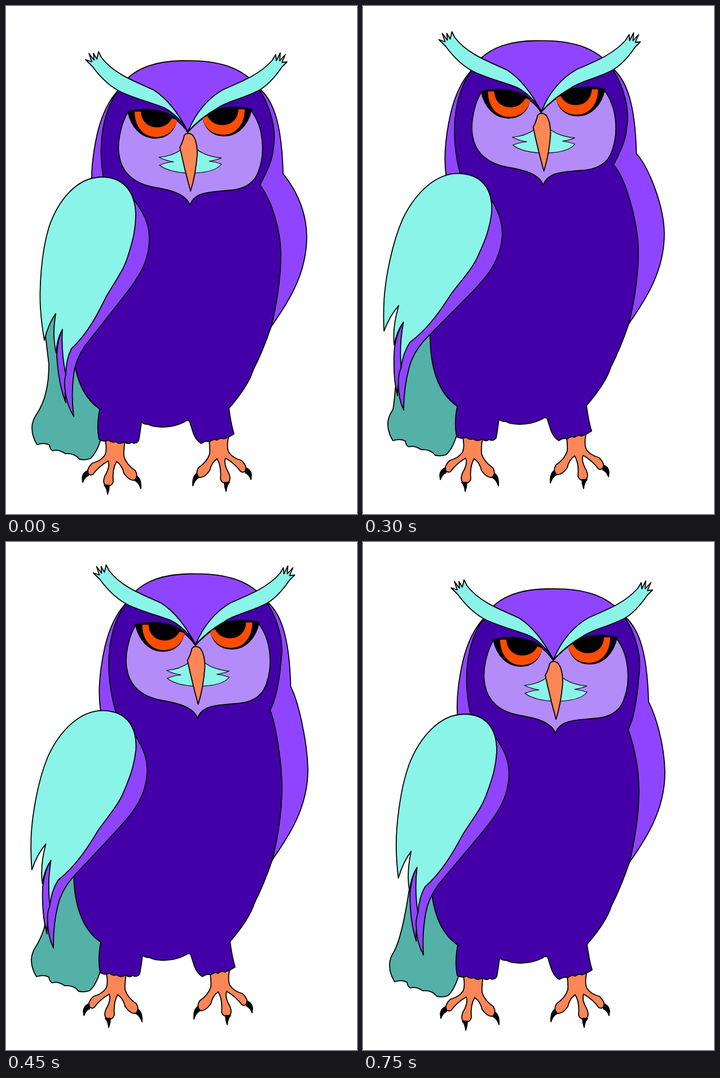
Animation, 622 px wide and 900 px high, one loop 900 ms. Source, as an HTML page:

```html
<!DOCTYPE html>
<html lang="en">
<head>
<meta charset="utf-8">
<title>Dancing owl</title>
<style>
  html, body { margin: 0; width: 100%; height: 100%; overflow: hidden; background: #fff; }
  svg { display: block; width: 622px; height: 900px; }
</style>
</head>
<body>
<svg id="stage" viewBox="0 0 622 900" stroke="#000" stroke-width="1.8" stroke-linejoin="round" stroke-linecap="round"></svg>
<script>
const AQUA = '#8bf4e8', VIOLET = '#8f45ff', INDIGO = '#4400a8', LILAC = '#b48cf9',
      ORANGE = '#ff4d00', CORAL = '#fd8656', TEAL = '#54b1a7';
const HOLD = 150;
const WING_PIVOT = [230, 350];

// head, body, tail: offsets. neck: where the right wing meets the hood.
// tailSide: left edge of the tail. wing: matrix around WING_PIVOT.
const poses = [
  { head: [0, 0], body: [0, 0], tail: [0, 0], neck: [450, 317],
    tailSide: [[76, 690], [76, 635], [67, 560]], wing: [1, 0, 0, 1, 0, 0] },
  { head: [-11.5, -22.5], body: [0, -2], tail: [-3, -3], neck: [439, 293],
    tailSide: [[60, 695], [62, 630], [62, 555]], wing: [1, .055, -.061, 1, 0, 0] },
  { head: [-6.5, -35.5], body: [1, -5], tail: [-2, -7], neck: [444, 281],
    tailSide: [[55, 705], [57, 680], [62, 640]], wing: [1, .1, -.127, 1, 0, 0] },
  { head: [13.5, -40.5], body: [2, -5], tail: [-1, -7], neck: [468, 298],
    tailSide: [[62, 702], [68, 683], [72, 650]], wing: [1, .07, -.1, 1, 2, 0] },
  { head: [25, -33], body: [2, -2], tail: [-2, -4], neck: [474, 328],
    tailSide: [[67, 695], [75, 657], [84, 620]], wing: [1, .02, -.055, .992, 0, 0] },
  { head: [15, -14], body: [2, 0], tail: [1, 2], neck: [470, 332],
    tailSide: [[70, 695], [82, 615], [88, 590]], wing: [1, .01, -.055, 1.008, 8, 3] }
];

const shape = (d, fill, extra = '') => `<path d="${d}" fill="${fill}" ${extra}/>`;
const group = (transform, content) => `<g transform="${transform}">${content}</g>`;
const move = ([x, y]) => `translate(${x} ${y})`;

// Shifts every "x,y" pair of a path fragment.
const shift = (d, [dx, dy]) =>
  d.replace(/(-?[\d.]+),(-?[\d.]+)/g, (_, x, y) => `${+x + dx},${+y + dy}`);

const foot =
  shape('M175,765 Q180,786 175,796 Q168,806 153,810 Q146,816 144,825 Q147,833 154,830 Q164,816 181,806 Q185,816 175,833 Q170,846 178,850 Q187,852 190,843 Q188,820 196,807 Q206,814 209,828 Q219,842 228,840 Q235,833 229,823 Q213,812 209,798 Q208,784 212,765Z', CORAL) +
  shape('M145,823 Q136,826 135,836 L136,844 Q139,835 146,832Z', '#000') +
  shape('M174,849 Q179,854 180,865 Q183,857 183,849Z', '#000') +
  shape('M232,833 Q240,838 239,855 Q235,844 229,841Z', '#000');

const feet = foot + group('translate(570 -5) scale(-1 1)', foot);

const wing =
  shape('M228,345 C243,365 254,385 254,412 C254,447 240,472 222,497 C196,532 163,572 140,602 Q123,627 120,652 Q115,690 120,727 Q108,708 105,682 Q104,690 106,703 Q93,670 90,620 Q91,590 100,573 L160,500Z', VIOLET) +
  shape('M170,303 C125,303 92,345 76,392 C62,438 59,500 61,535 Q63,565 68,592 Q75,563 88,545 C84,570 84,595 89,615 Q90,590 100,573 C98,605 101,630 106,653 Q106,627 116,607 C145,580 163,545 178,514 C195,485 210,466 217,440 C226,412 230,392 230,368 C228,325 205,303 170,303Z', AQUA) +
  shape('M106,653 Q102,666 105,682', 'none');

const eye =
  shape('M216,187 C245,180 280,182 302,200 C300,221 285,234 265,234 C240,234 222,215 216,187Z', '#000') +
  shape('M228,187 L239,187 C240,205 252,215 268,215 C280,215 290,208 294,199 L303,202 C298,222 285,232 265,232 C245,232 228,215 228,187Z', ORANGE, 'stroke="none"');

const face =
  shape('M216,188 C203,210 196,245 201,267 C206,297 229,315 262,321 C292,326 319,333 326,353 C334,328 365,330 390,327 C425,326 443,312 449,288 C458,262 458,215 434,185 C400,176 360,180 322,224 C300,190 260,180 216,188Z', LILAC) +
  eye + group('translate(651 -4) scale(-1 1)', eye) +
  shape('M311,254 Q295,266 271,268 Q283,274 297,276 Q284,277 272,282 Q289,295 325,296 Q370,296 382,280 Q371,276 360,275 Q373,273 382,269 Q355,267 338,254Z', AQUA, 'stroke-width="1.2"') +
  shape('M316,229 Q322,222 331,229 Q339,240 339,262 Q336,300 327,328 Q316,288 308,250 Q313,242 316,229Z', CORAL) +
  shape('M169,91 L164,81 L161,94 L155,84 L156,96 L147,84 L152,99 L141,95 L153,107 C170,130 186,144 205,153 C235,166 260,172 280,180 Q306,194 322,222 C306,191 288,166 262,149 C235,136 192,122 169,91Z', AQUA) +
  shape('M472,96 L478,86 L479,97 L486,83 L485,97 L495,86 L489,100 L498,99 L489,108 C474,130 460,143 447,150 C417,165 392,169 376,180 Q343,199 323,222 C336,188 360,162 385,148 C420,133 450,121 472,96Z', AQUA);

function tail({ tail, tailSide: [low, mid, top] }) {
  const [x, y] = top;
  return shape(
    shift('M175,720 L168,768 Q160,793 149,802 Q140,805 130,803 Q122,792 105,793 Q93,785 83,788 Q78,786 77,778 Q69,773 55,777 Q46,763 46,747 Q46,735 55,722', tail) +
    `Q${low} ${mid} L${top} L${x + 10},${y - 30} L100,545 L130,580Z`, TEAL);
}

// Dome, hood and right wing in one piece.
function back({ head, body }) {
  const [x, y] = [491 + head[0], 297 + head[1]];
  return shape(
    shift('M154,338 C149,305 153,265 162,225 Q174,175 200,148 C220,113 260,98 310,97 C372,95 418,106 450,147 C476,170 489,215 491,297', head) +
    `C${x + (535 - x) * .4},${y + 22} ` + shift('532,355 533,408 C533,475 500,525 470,568 L300,500Z', body), VIOLET);
}

function torso({ head, body, neck: [x, y] }) {
  return shape(
    shift('M182,345 C169,300 166,265 170,230 Q176,180 200,148 Q290,155 322,222 Q360,155 448,146 C470,180 479,220 474,250', head) +
    shift('C472,275', head) + ` ${x + 12},${y - 23} ${x},${y} C${x + (487 - x) * .6},${y + 30} ` +
    shift('487,400 487,440 C487,490 478,535 470,568 Q455,612 438,645 Q430,672 395,713 Q399,742 404,758 Q395,764 386,767 Q380,764 374,769 Q367,766 361,772 Q354,769 346,775 Q337,770 332,757 L325,735 Q320,733 316,737 Q298,746 277,746 Q260,746 252,741 Q246,742 240,737 Q238,754 235,770 Q230,777 222,773 Q216,778 210,772 Q201,778 195,772 Q187,774 182,769 Q173,773 165,768 Q160,745 166,714 C130,690 118,640 118,590Z', body), INDIGO);
}

function wingTransform([a, b, c, d, tx, ty]) {
  const [px, py] = WING_PIVOT;
  return `translate(${px + tx} ${py + ty}) matrix(${a} ${b} ${c} ${d} 0 0) translate(${-px} ${-py})`;
}

const owl = pose =>
  tail(pose) +
  group(move(pose.body), feet) +
  back(pose) +
  torso(pose) +
  group(wingTransform(pose.wing), wing) +
  group(move(pose.head), face);

const stage = document.getElementById('stage');
let shown = -1;

function render() {
  const index = Math.floor(performance.now() / HOLD) % poses.length;
  if (index !== shown) {
    stage.innerHTML = owl(poses[index]);
    shown = index;
  }
  requestAnimationFrame(render);
}
render();
</script>
</body>
</html>
```
